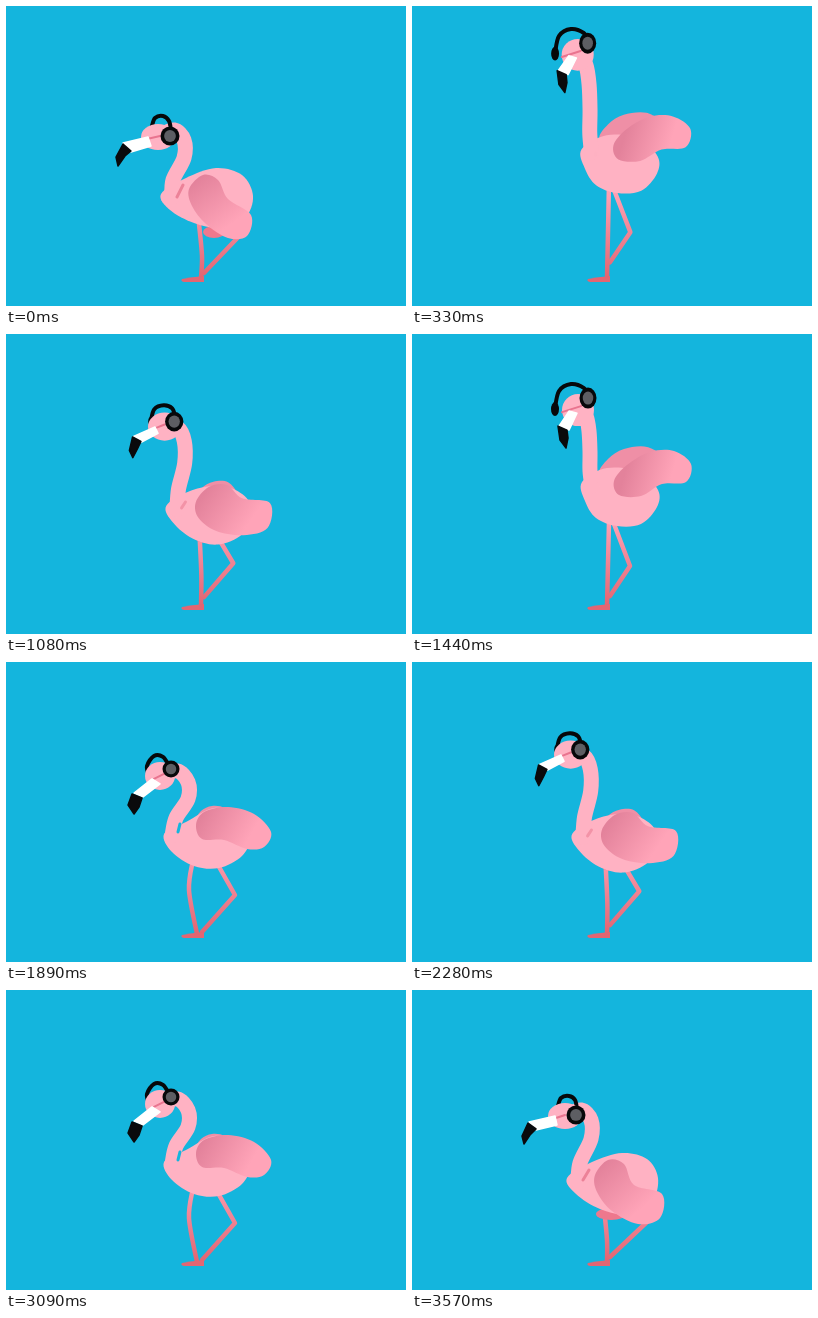
Write an HTML page that moves like this. It is 400 px wide and 300 px high and loops after 3.6 s.

```html
<!DOCTYPE html>
<html lang="en">
<head>
<meta charset="utf-8">
<title>Dancing flamingo</title>
<style>
  html, body { margin: 0; width: 100%; height: 100%; overflow: hidden; background: #14b5dd; }
  svg { display: block; width: 100vw; height: 100vh; }
</style>
</head>
<body>
<svg id="stage" viewBox="0 0 400 300">
  <defs>
    <linearGradient id="legTone" gradientUnits="userSpaceOnUse" x1="0" y1="190" x2="0" y2="275">
      <stop offset="0" stop-color="#ff9fb2"/><stop offset="1" stop-color="#e0626f"/>
    </linearGradient>
    <linearGradient id="wingTone" gradientUnits="userSpaceOnUse">
      <stop offset="0" stop-color="#e3829b"/><stop offset=".75" stop-color="#ffa4b8"/>
    </linearGradient>
  </defs>
  <rect width="400" height="300" fill="#14b5dd"/>
</svg>
<script>
const stage = document.getElementById('stage');
const wingTone = document.getElementById('wingTone');

const BEAT = 600;
const LOOP = 2 * BEAT;
// crouch, rising, tall, top of the bounce, sinking
const KEYS = [0, 78, 209, 287, 548];
// moments within two beats at which the pose changes
const TICKS = [0, 60, 120, 180, 240, 270, 330, 390, 450, 480, 540, 600,
               660, 690, 750, 810, 840, 900, 960, 1020, 1080, 1140, 1170];

const nums = s => s.split(/[ ,]+/).map(Number);

function shape(tag, attrs) {
  const el = document.createElementNS('http://www.w3.org/2000/svg', tag);
  for (const k in attrs) el.setAttribute(k, attrs[k]);
  stage.appendChild(el);
  return el;
}

// Poses: crouch, rising, tall, sinking. The top pose is the tall one
// lifted by an amount that runs from lift[0] to lift[1] along the points.
function poses(crouch, rising, tall, sinking, lift) {
  const [a, b, c, d] = [crouch, rising, tall, sinking].map(nums);
  const pairs = Math.max(1, c.length / 2 - 1);
  const top = c.map((v, i) =>
    i % 2 ? v + lift[0] + (lift[1] - lift[0]) * ((i - 1) / 2) / pairs : v);
  return [a, b, c, top, d];
}

// Periodic monotone cubic through the key poses.
function sample(keys, t) {
  const n = KEYS.length;
  let k = n - 1;
  while (KEYS[k] > t) k--;
  const at = i => KEYS[(i + n) % n] + BEAT * Math.floor(i / n);
  const gap = at(k + 1) - at(k);
  const u = (t - at(k)) / gap;
  return keys[0].map((_, j) => {
    const val = i => keys[(i + n) % n][j];
    const rise = i => (val(i + 1) - val(i)) / (at(i + 1) - at(i));
    const slope = i => {
      const p = rise(i - 1), q = rise(i);
      return p * q <= 0 ? 0 : 2 * p * q / (p + q);
    };
    const v = 1 - u;
    return val(k) * v * v * (1 + 2 * u) + val(k + 1) * u * u * (3 - 2 * u)
      + gap * u * v * (slope(k) * v - slope(k + 1) * u);
  });
}

function curve(p, closed) {
  const n = p.length / 2;
  const pt = i => {
    const j = closed ? (i + n) % n : Math.min(n - 1, Math.max(0, i));
    return [p[2 * j], p[2 * j + 1]];
  };
  let d = 'M' + pt(0);
  for (let i = 0; i < (closed ? n : n - 1); i++) {
    const [a, b, c, e] = [pt(i - 1), pt(i), pt(i + 1), pt(i + 2)];
    const h1 = b.map((v, m) => v + (c[m] - a[m]) / 6);
    const h2 = c.map((v, m) => v - (e[m] - b[m]) / 6);
    d += 'C' + [h1, h2, c].join(' ');
  }
  return d + (closed ? 'Z' : '');
}

const parts = [];
const add = (keys, draw) => parts.push({ keys, draw });

function blob(fill, keys, extra) {
  const el = shape('path', { fill });
  add(keys, p => {
    el.setAttribute('d', curve(p, true));
    if (extra) extra(p);
  });
}

function poly(fill, keys) {
  const el = shape('polygon', { fill, stroke: fill, 'stroke-width': 1.5, 'stroke-linejoin': 'round' });
  add(keys, p => el.setAttribute('points', p.join(' ')));
}

function line(stroke, width, keys, straight) {
  const el = shape('path', {
    fill: 'none', stroke, 'stroke-width': width,
    'stroke-linecap': 'round', 'stroke-linejoin': 'round'
  });
  add(keys, p => el.setAttribute('d', straight ? 'M' + p.join(' ') : curve(p, false)));
}

// Each pose is: cx cy rx ry
function oval(fill, a, b, c, d, lift, scale = 1) {
  const el = shape('ellipse', { fill });
  const keys = poses(a, b, c, d, [0, 0]);
  keys[3][1] += lift;
  add(keys, ([x, y, rx, ry]) => {
    el.setAttribute('cx', x);
    el.setAttribute('cy', y);
    el.setAttribute('rx', rx * scale);
    el.setAttribute('ry', ry * scale);
  });
}

const PINK = '#ffb2c3';
const UP = [-29, -29];

// legs
line('url(#legTone)', 4.5, poses(
  '215 205 239 224 198 267',
  '212 203 229 233 196 270',
  '202 190 218 232 198 262',
  '215 210 236 231 198 267', [-6, -6]), true);
line('url(#legTone)', 4.5, poses(
  '193 218 196 250 195 272',
  '187 198 183 228 191 272',
  '197 188 196 230 195 272',
  '192 218 195 250 195 272', [-6, 0]));
shape('path', { d: 'M176 273Q186 271 198 270L198 276L178 276Q174 275 176 273Z', fill: '#e36572' });

oval('#ee788d', '208 226 11 6', '203 192 9 5', '206 178 9 5', '199 224 15 6', -6);

// far wing
blob('#ef8fa6', poses(
  '190 185 195 175 205 170 215 172 220 185 205 190',
  '190 160 195 149 206 144 218 146 220 156 205 161',
  '188 140 196 125 212 115 235 113 248 125 215 146',
  '190 185 195 175 205 170 215 172 220 185 205 190', [-8, -8]));

// body and neck
blob(PINK, poses(
  '155 188 164 204 188 217 215 222 239 212 247 190 236 169 210 162 180 172',
  '158 172 166 190 188 204 213 206 236 194 244 175 232 153 208 146 180 160',
  '170 148 173 167 184 184 205 192 229 190 245 173 246 156 228 138 195 134',
  '155 188 164 204 188 219 215 224 240 211 246 188 235 169 210 163 180 172', [-6, -6]));
line(PINK, 15, poses(
  '153 130 168 124 178 134 178 152 167 174 166 192',
  '154 114 171 109 182 120 182 137 170 156 166 174',
  '167 76 174 82 177 97 178 118 178 137 180 152',
  '154 126 169 120 179 130 179 149 168 173 166 192', [-29, -6]));

// gap between neck and chest: two points and a colour
const gap = shape('path', { fill: 'none', 'stroke-width': 3, 'stroke-linecap': 'round' });
add(poses(
  '177 179 171 191 236 130 152',
  '174 162 172 170 20 181 221',
  '184 146 184 148 255 178 195',
  '177 180 171 190 236 130 152', [0, 0]), p => {
  gap.setAttribute('d', 'M' + p.slice(0, 4).join(' '));
  gap.setAttribute('stroke', `rgb(${p.slice(4).map(Math.round)})`);
});

// near wing, shaded from shoulder to tip
blob('url(#wingTone)', poses(
  '186 200 183 183 197 169 212 174 222 193 245 209 241 230 222 232 200 218',
  '196 177 190 163 198 150 222 145 248 152 265 170 258 185 241 187 218 178',
  '207 161 202 147 215 131 238 118 262 117 279 130 274 148 250 150 229 162',
  '185 202 183 185 196 170 212 174 222 195 250 204 248 228 226 234 200 221', [-9, -9]), p => {
  wingTone.setAttribute('x1', p[4]);
  wingTone.setAttribute('y1', p[5]);
  wingTone.setAttribute('x2', p[12]);
  wingTone.setAttribute('y2', p[13]);
});

// headband goes behind the head
line('#07080a', 4, poses(
  '146 120 149 112 157 110 163 115 165 124',
  '143 114 141 104 148 94 157 95 163 104',
  '143 74 147 57 159 50 172 54 177 62',
  '146 116 149 108 157 106 163 110 165 119', UP));
oval('#07080a', '146 121 2 3', '143 112 3 4', '143 75 4 7', '146 117 2 3', -29);

// head and beak
oval(PINK, '152 131 17 13', '154 114 15 14', '166 76 16 16', '153 126 17 13', -29);
line('#e9748f', 2, poses(
  '141 133 154 130',
  '148 117 158 112',
  '150 78 169 72',
  '141 129 153 125', UP));
poly('#ffffff', poses(
  '117 137 142 131 145 140 125 146',
  '128 131 146 117 154 122 137 135',
  '147 92 157 77 165 79 157 96',
  '117 132 143 126 145 135 124 140', UP));
poly('#0a0a0c', poses(
  '117 138 125 145 119 150 112 160 110 151',
  '126 132 136 136 133 145 128 152 122 143',
  '146 92 155 96 156 104 154 114 148 106',
  '116 133 124 139 118 145 112 154 110 146', UP));

// ear cup
const cup = ['164 130 9.5 9.5', '165 107 8.5 8.5', '176 64 8.5 10.5', '164 125 9.5 9.5', -29];
oval('#07080a', ...cup);
oval('#5d5e63', ...cup, 0.62);

function render(ms) {
  const now = ms % LOOP;
  let step = TICKS.length - 1;
  while (TICKS[step] > now) step--;
  const t = step / TICKS.length * LOOP % BEAT;
  for (const part of parts) part.draw(sample(part.keys, t));
}

const start = performance.now();
function frame() {
  render(performance.now() - start);
  requestAnimationFrame(frame);
}
frame();
</script>
</body>
</html>
```
